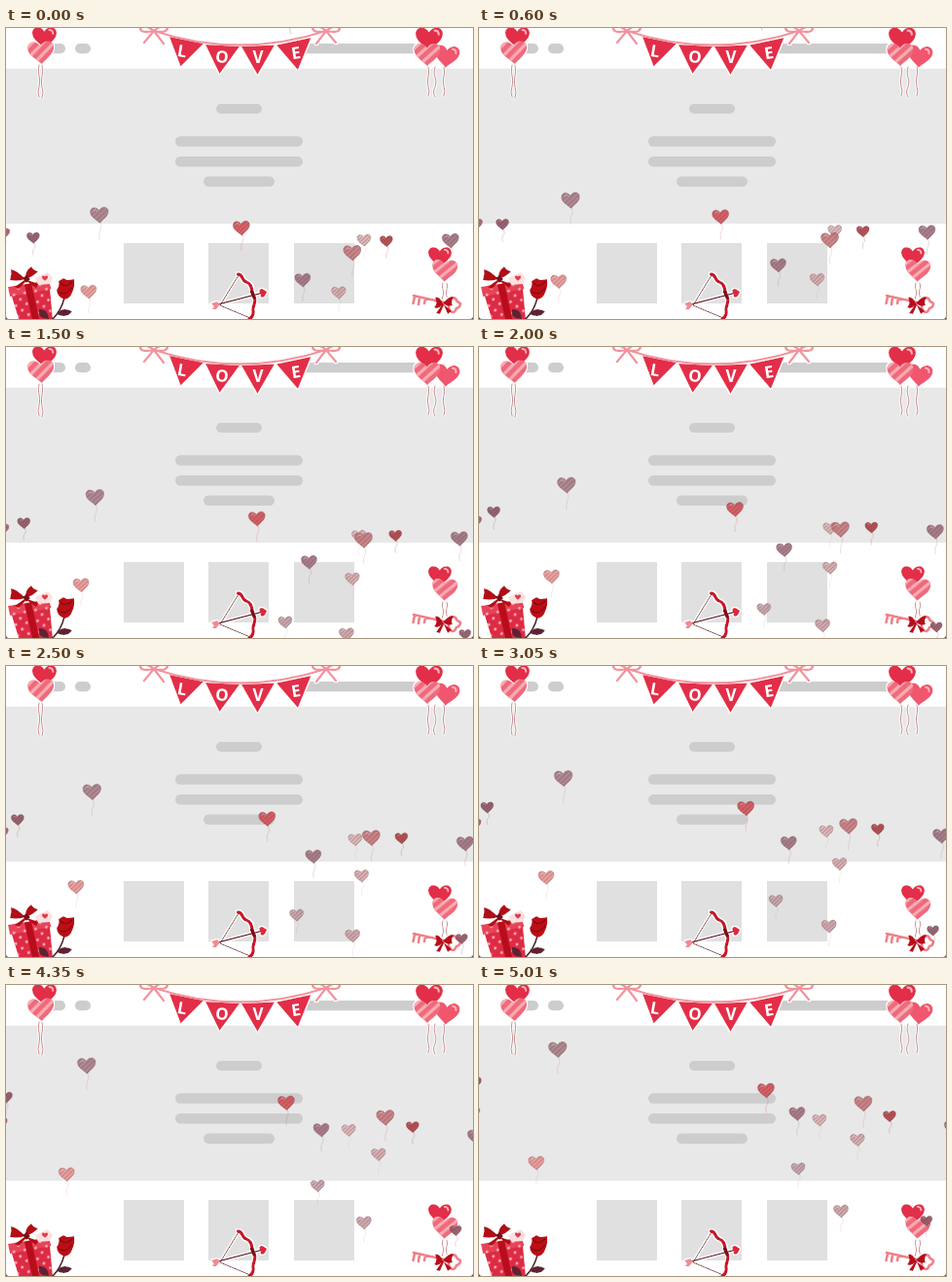
These frames come from a looping animation (480 by 299 pixels, 5060 ms). An HTML page:

```html
<!DOCTYPE html>
<html lang="en">
<head>
<meta charset="utf-8">
<title>Valentine page</title>
<style>
  html, body { margin: 0; width: 100%; height: 100%; overflow: hidden; background: #fff; }
  svg { display: block; width: 100vw; height: 100vh; }
  text { font: 600 17px "Noto Sans", sans-serif; fill: #fff; text-anchor: middle; }
  .line { fill: none; stroke-linecap: round; stroke-linejoin: round; }
</style>
</head>
<body>
<svg viewBox="0 0 480 299" preserveAspectRatio="none">
  <defs>
    <path id="heart" d="M0 9C-3 5.500-10 2-10-3.500C-10-9-3-10-.2-4.800C3-10 10-9 10-3.500C10 2 3 5.500 0 9Z"/>
    <pattern id="stripes" width="6" height="6" patternUnits="userSpaceOnUse" patternTransform="rotate(-42)">
      <path d="M0 2H6" stroke="#f9adb2" stroke-width="2.400"/>
    </pattern>
    <pattern id="hatch" width="4" height="4" patternUnits="userSpaceOnUse" patternTransform="rotate(-40)">
      <path d="M0 2H4" stroke="#602d38" stroke-opacity=".4" stroke-width="1.100"/>
    </pattern>
    <pattern id="dots" width="8" height="8" patternUnits="userSpaceOnUse" patternTransform="rotate(35)">
      <circle cx="4" cy="4" r="1.400" fill="#ffb4bb"/>
    </pattern>
    <filter id="sticker" x="-15%" y="-15%" width="130%" height="130%">
      <feMorphology in="SourceAlpha" operator="dilate" radius="1.3" result="edge"/>
      <feFlood flood-color="#fff"/>
      <feComposite in2="edge" operator="in"/>
      <feMerge><feMergeNode/><feMergeNode in="SourceGraphic"/></feMerge>
    </filter>
  </defs>

  <rect width="480" height="299" fill="#fff"/>
  <rect y="41.700" width="480" height="159.300" fill="#e8e8e8"/>
  <g fill="#cdcdcd">
    <rect x="22" y="16" width="39" height="10.300" rx="5.100"/>
    <rect x="71" y="16" width="16" height="10.300" rx="5.100"/>
    <rect x="296" y="16" width="144" height="10.300" rx="5.100"/>
    <rect x="216" y="78" width="47" height="10" rx="5"/>
    <rect x="174" y="111.300" width="131" height="10.500" rx="5.200"/>
    <rect x="174" y="132" width="131" height="10.500" rx="5.200"/>
    <rect x="203" y="152.500" width="73" height="10.500" rx="5.200"/>
  </g>
  <g fill="#e0e0e0">
    <rect x="121" y="221" width="62" height="62"/>
    <rect x="208" y="221" width="62" height="62"/>
    <rect x="296" y="221" width="62" height="62"/>
  </g>

  <!-- Bunting -->
  <g filter="url(#sticker)">
    <g fill="#e32f48">
      <path d="M168 9L203 16L179.500 39.500Z"/>
      <path d="M205 17L240 19L219.500 47Z"/>
      <path d="M242 19L276 17.500L258.500 48Z"/>
      <path d="M278 17.500L313.500 10L300 43Z"/>
    </g>
    <g class="line" stroke="#f3929d" stroke-width="2.300">
      <path d="M152 3Q240 32 329 3"/>
      <path id="knot" d="M152 3Q143-4 138 0Q138 6 152 3Q161-5 166 0Q165 6 152 3L142 15M152 3L162 16"/>
      <use href="#knot" transform="translate(481 0) scale(-1 1)"/>
    </g>
  </g>
  <text transform="translate(180 29.500) rotate(10)">L</text>
  <text transform="translate(221.500 35.500) rotate(5)">O</text>
  <text transform="translate(259 36)">V</text>
  <text transform="translate(299 31.500) rotate(-9)">E</text>

  <g id="bunches"></g>

  <!-- Gift and rose -->
  <g filter="url(#sticker)">
    <path id="box" d="M5 273L45 266L48 299H13Z" fill="#dd2c45"/>
    <path d="M5 273L45 266L48 299H13Z" fill="url(#dots)"/>
    <path d="M2 266L44 259L46.500 268L4 276Z" fill="#e64358"/>
    <path d="M2 266L44 259L46.500 268L4 276Z" fill="url(#dots)"/>
    <path d="M19 264L26 262L34 299H27Z" fill="#b90d1b"/>
    <path d="M30 257L43 251L48 257L45 263L33 264Z" fill="#fbe1e0"/>
    <use href="#heart" transform="translate(40 257) scale(.3)" fill="#e33b4c"/>
    <path d="M20 258Q10 248 5 248Q6 253 4 259Q12 261 20 258Q29 255 33 250Q28 249 26 245Q19 250 20 258L9 266L13 268L21 260L31 267L33 263Z" fill="#b30d18"/>
    <path d="M17 257L21 254L25 258L21 262Z" fill="#7c0a12"/>
    <path class="line" d="M60 277Q57 290 48 299" stroke="#51222b" stroke-width="1.800"/>
    <path d="M44 299Q32 299 34 289Q43 288 44 299ZM52 294Q57 286 68 291Q63 299 52 294Z" fill="#602333"/>
    <path d="M54 260L59 257L63 259L70 258Q71 266 68 272Q66 278 60 279Q52 276 52 269Q55 266 54 260Z" fill="#bd0d16"/>
    <path class="line" d="M56 262Q61 268 68 261M54 271Q61 276 68 267" stroke="#7e0710" stroke-width="1.200"/>
  </g>

  <!-- Bow and arrow -->
  <g filter="url(#sticker)" class="line">
    <path d="M239 254L220 285L251 298" stroke="#7b2731" stroke-width="1"/>
    <path d="M214 285L264 272" stroke="#74222d" stroke-width="1.300"/>
    <path d="M238.500 253C244 253 242 260 247 261C254 263 252 272 255 276C258 281 253 287 254 290Q255 296 250 299" stroke="#c9182b" stroke-width="3.300"/>
    <path d="M252.500 271L255 277" stroke="#7d0d1b" stroke-width="3.300"/>
    <path d="M211 283L217 281L220 284L216 289L212 289L214 286Z" fill="#f28a92"/>
    <use href="#heart" transform="translate(264.500 272) rotate(-105) scale(.44)" fill="#df263d"/>
  </g>

  <!-- Key -->
  <g filter="url(#sticker)" class="line">
    <g stroke="#f08089" stroke-width="2.700">
      <path d="M419 275L455 283M420 276L418.500 283M425 277L424 284M431 278L430 283"/>
      <path d="M455 283Q456 275 462 278Q463 281 467 283Q467 287 463 288Q461 294 457 291Q454 288 455 283Z"/>
    </g>
    <path d="M449 283Q445 275 441 277Q444 283 440 287Q445 290 449 283Q456 274 460 277Q457 281 459 285Q454 287 449 283L442 293L446 294L450 285L454 294L458 291Z" fill="#b9111f"/>
  </g>

  <path id="loose" class="line" stroke="#c8b0b2" stroke-width=".7"/>
  <g id="balloons"></g>
  <path d="M0 296V299H3Q0 299 0 296ZM480 296V299H477Q480 299 480 296Z" fill="#333"/>
</svg>
<script>
const LOOP = 5060, STEP = 50, LAST = 5010;

const heart = (x, y, width, fill, extra = '', tilt = 0) => {
  const at = `transform="translate(${x} ${y}) rotate(${tilt}) scale(${width / 20})"`;
  return `<g ${at}><use href="#heart" fill="${fill}"/>${extra}</g>`;
};
const striped = '<use href="#heart" fill="url(#stripes)"/>';
const shine = '<path class="line" d="M4-6Q7-6 7-3" stroke="#ffb0b8" stroke-width="1.500"/>';
const string = (x, top, bottom, sway) => {
  const h = (bottom - top) / 3;
  return `<path class="line" d="M${x} ${top}c${sway} ${h} ${-sway} ${h} 0 ${2 * h}q${sway} ${h / 2} 0 ${h}"
    stroke="#b74a55" stroke-width=".8"/>`;
};
const bunch = (...parts) => `<g filter="url(#sticker)">${parts.join('')}</g>`;

document.getElementById('bunches').innerHTML =
  bunch(string(34, 38, 71, -2), string(37, 38, 72, 2),
    heart(39.5, 9.5, 25, '#e32f48', shine), heart(36, 25, 27, '#ee6a7c', striped, -4)) +
  bunch(string(434, 40, 70, 2), string(441, 40, 71, -3), string(450, 40, 70, 2),
    heart(435, 11, 28, '#e32f48', shine), heart(453, 29, 26, '#f0566e', shine, 6),
    heart(433, 27, 27, '#ee6a7c', striped)) +
  bunch(string(449, 262, 282, -2), string(453, 262, 282, 2),
    heart(446, 235, 24, '#e32f48', shine), heart(451, 249, 26, '#ee6a7c', striped, 3));

// x, y at the loop start; velocity in px/s; heart width; colour
const balloons = [
  [96, 192, -3, -25.1, 18.5, '#ab838b'],
  [28, 215.5, -6.4, -23, 13, '#8f5865'],
  [-2, 211, -.6, -16, 12, '#aa6470'],
  [85, 271, -5.2, -17.6, 16, '#eb9a96'],
  [242, 205.5, 10.6, -19.4, 17, '#d6555a'],
  [269.5, 323, 11.7, -26.8, 14, '#c3a3a8'],
  [340.6, 322, 6.3, -17.9, 15, '#cda4a8'],
  [305, 259, 4.4, -25.3, 16, '#a27681'],
  [342, 272, 9.4, -22.5, 14.5, '#d6abad'],
  [368, 218, -3.6, -15.8, 14, '#dcb5b6'],
  [356, 231, 7.8, -21.8, 18, '#c97d7f'],
  [391, 219, 6.2, -16.8, 13, '#b14346'],
  [457, 218.5, 6, -14.4, 17, '#a07681'],
  [477, 318, -3.4, -15.1, 12, '#8f5b68']
].map(([x, y, vx, vy, width, colour]) => ({ x, y, vx, vy, width, colour }));

const layer = document.getElementById('balloons');
layer.innerHTML = balloons.map(({ width, colour }) => `<g opacity=".92">
  <path class="line" d="M1 ${width * .4}q2 5 0 ${width * .45}t-1 ${width * .5}"
    stroke="${colour}" stroke-opacity=".45" stroke-width=".6"/>
  ${heart(0, 0, width, colour, `<use href="#heart" fill="url(#hatch)" stroke="#5d2b35"
    stroke-opacity=".4" stroke-width=".8"/><path class="line" d="M-6-5Q-4-7-2-5"
    stroke="#fff" stroke-opacity=".4"/>`, -3)}
</g>`).join('');
const loose = document.getElementById('loose');

function draw(now) {
  const time = now % LOOP;
  const ms = time >= LAST ? LAST : Math.min(LAST - 60, Math.floor(time / STEP) * STEP);
  const t = ms / 1000;
  balloons.forEach((b, i) => layer.children[i].setAttribute('transform',
    `translate(${b.x + b.vx * t} ${b.y + b.vy * t})`));
  loose.setAttribute('d', `M${293 - 3 * t} ${-6 - 6 * t}q-3 6 0 12`);
  requestAnimationFrame(draw);
}
draw(performance.now());
</script>
</body>
</html>
```
